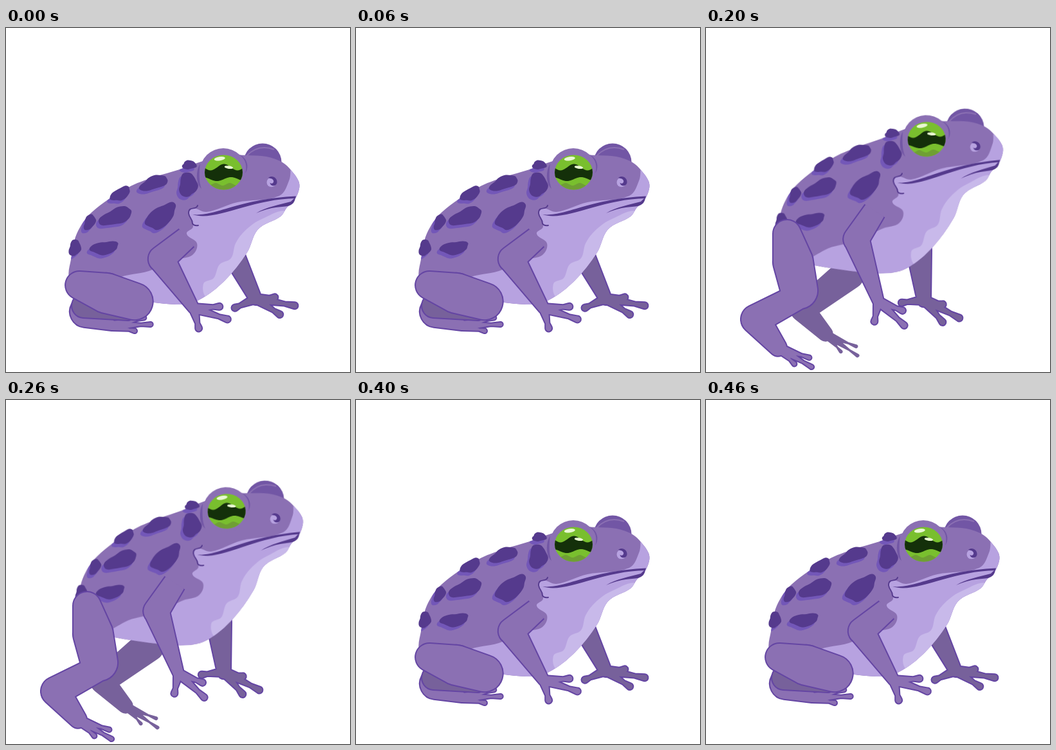
An HTML page that plays this animation: 535 by 535 pixels, repeating every 0.5 s.

```html
<!DOCTYPE html>
<html lang="en">
<head>
<meta charset="utf-8">
<title>Purple frog</title>
<style>
  html, body { margin: 0; width: 100%; height: 100%; overflow: hidden; background: #fff; }
  svg { display: block; width: 535px; height: 535px; }
  .limb { fill: #8b70b3; stroke: #6445a3; stroke-width: 4; paint-order: stroke; stroke-linejoin: round; }
  .far { fill: #77619b; }
  .shade { fill: #77619b; }
  .skin { fill: #8b70b3; }
  .pale { fill: #b7a2e0; }
  .glow { fill: #c8b9ea; }
  .fold { fill: #7256a5; }
  .spot { fill: #553a8d; }
  .rim { fill: #7357b8; }
  .pupil { fill: #14300a; }
  .moss { fill: #6f9f34; }
  .line { fill: none; stroke: #553a8d; stroke-width: 1.9; stroke-linecap: round; }

  .pose, #body, #nostril { animation: 500ms step-end infinite; }
  #body { animation-name: sway; transform-origin: 107px 342px; }
  #nostril { animation-name: nostril; }
  .rest { animation-name: rest; }
  .rise { animation-name: rise; }
  .leap { animation-name: leap; }
  .land { animation-name: land; }

  @keyframes sway {
    0%, 80%, 100% { transform: none; }
    20% { transform: translate(10px, -47.5px) rotate(8.2deg); }
    40% { transform: translate(10px, -41.5px) rotate(-2.5deg); }
    60% { transform: translate(3.2px, 12px) rotate(-8.7deg); }
  }
  @keyframes nostril { 0%, 40%, 100% { fill: #553a8d; } 20% { fill: #26132f; } }
  @keyframes rest { 0%, 80%, 100% { visibility: visible; } 20% { visibility: hidden; } }
  @keyframes rise { 0%, 40%, 100% { visibility: hidden; } 20% { visibility: visible; } }
  @keyframes leap { 0%, 60%, 100% { visibility: hidden; } 40% { visibility: visible; } }
  @keyframes land { 0%, 80%, 100% { visibility: hidden; } 60% { visibility: visible; } }
</style>
</head>
<body>
<svg viewBox="0 0 535 535">
  <defs>
    <clipPath id="torsoClip"></clipPath>
    <clipPath id="eyeClip"><ellipse cx="338.500" cy="224.500" rx="29.500" ry="27"/></clipPath>
  </defs>
  <g id="back"></g>
  <g id="body">
    <circle class="fold" cx="399" cy="209" r="29.600"/>
    <path d="M374 199Q392 180 417 189" fill="none" stroke="#8b70b3" stroke-width="2"/>
    <g id="torso"></g>
    <g id="belly" clip-path="url(#torsoClip)"></g>
    <g id="rims" clip-path="url(#torsoClip)"></g>
    <g id="spots"></g>
    <ellipse class="skin" cx="338" cy="222" rx="36" ry="35"/>
    <path class="fold" d="M302 211C294 224 296 243 304 250C300 240 300 224 302 211ZM363 197C374 205 375 216 372 226C379 216 375 202 363 197Z"/>
    <g clip-path="url(#eyeClip)">
      <path fill="#79bf2e" d="M300 190H375V260H300Z"/>
      <g id="iris"></g>
    </g>
    <g fill="#e9f8d2">
      <ellipse cx="332.300" cy="203.200" rx="8.600" ry="3" transform="rotate(-8 332.300 203.200)"/>
      <ellipse cx="346.500" cy="216.600" rx="6.800" ry="2.300" transform="rotate(8 346.500 216.600)"/>
    </g>
    <circle class="pale" cx="412.800" cy="240" r="7.300"/>
    <path id="nostril" fill="#553a8d" d="M408 233C414 228 422 233 421.500 240C421 247 411 247 410.500 240.500C413 243.500 417 241 416 237.500C415 234 411 234 408 233Z"/>
    <path class="spot" d="M290 290C325 294 360 266 451 261.500L450 265C380 266 325 302 290 290ZM389 288C405 278 425 275 443 270L450 263C449 280 432 277 420 279Q405 281 389 288Z"/>
    <path class="line" d="M298 276C296 284 284 276 284 288C285 296 290 296 290 304Q292 308 299 307"/>
  </g>
  <g id="front"></g>
</svg>
<script>
const NS = 'http://www.w3.org/2000/svg';
const get = id => document.getElementById(id);
const rad = deg => deg * Math.PI / 180;

function add(parent, tag, attrs) {
  const el = document.createElementNS(NS, tag);
  for (const k in attrs) el.setAttribute(k, attrs[k]);
  return parent.appendChild(el);
}
const draw = (id, cls, d) => add(get(id), 'path', { class: cls, d });

// Smooth closed curve through points.
function smooth(pts) {
  const n = pts.length, at = i => pts[(i + n) % n];
  const dir = i => {
    const a = at(i - 1), b = at(i + 1), l = Math.hypot(b[0] - a[0], b[1] - a[1]);
    return [(b[0] - a[0]) / l, (b[1] - a[1]) / l];
  };
  let d = 'M' + pts[0];
  for (let i = 0; i < n; i++) {
    const a = at(i), b = at(i + 1), u = dir(i), v = dir(i + 1);
    const k = Math.hypot(b[0] - a[0], b[1] - a[1]) / 3;
    d += `C${a[0] + u[0] * k},${a[1] + u[1] * k},${b[0] - v[0] * k},${b[1] - v[1] * k},${b}`;
  }
  return d + 'Z';
}
const through = text => smooth(text.trim().split(/\s+/).map(p => p.split(',').map(Number)));

// Torso, belly and chest
const torso = through(`98,388 101,360 110,320 134,286 190,248 230,232 270,220 300,209 340,198 375,198 405,200
  430,209 444,222 455,238 456,250 449,267 437,279 427,293 392,313 375,349 340,393 300,423 265,430 190,420 110,400`);
draw('torso', 'skin', torso);
draw('torsoClip', '', torso);
draw('belly', 'pale', through(`446,210 441,235 425,261 360,271 312,286 290,280 284,288 291,309 281,320 297,335
  290,353 265,360 222,378 172,390 140,420 230,450 400,400 480,280`));
draw('belly', 'glow', through('440,287 398,297 372,315 357,335 350,358 332,368 323,389 307,398 314,420 350,410 430,320'));

// Eye: bands bounded by waves
const wave = (mid, amp, crest, len) => x => mid - amp * Math.cos(2 * Math.PI * (x - crest) / len);
function band(cls, top, bottom) {
  const xs = Array.from({ length: 36 }, (_, i) => 304 + i * 2);
  const edge = f => x => `${x} ${f(x).toFixed(1)}`;
  draw('iris', cls, 'M' + [...xs.map(edge(top)), ...xs.reverse().map(edge(bottom))].join('L') + 'Z');
}
band('pupil', wave(216.5, 5, 339, 42), wave(235, 3, 350, 44));
band('moss', wave(243, 2, 326, 22), () => 260);

// Warts: lumpy ellipses over a shifted rim
[
  [107, 342, 9, 13, 15], [130, 302, 8, 13, 25], [178, 258, 17, 9, -28],
  [171, 293, 27, 12, -20], [230, 241, 23, 10, -20], [285, 213, 11, 7, -5],
  [283, 244, 14, 19, 5], [241, 293, 27, 15, -38], [153, 342, 22, 10, -8]
].forEach(([x, y, rx, ry, turn], n) => {
  const lump = (dx, dy) => smooth(Array.from({ length: 14 }, (_, i) => {
    const t = i * Math.PI / 7, k = 1 + .1 * Math.cos(3 * t + n) + .05 * Math.cos(5 * t + 2 * n);
    const u = rx * k * Math.cos(t), v = ry * k * Math.sin(t), c = Math.cos(rad(turn)), s = Math.sin(rad(turn));
    return [x + dx + u * c - v * s, y + dy + u * s + v * c];
  }));
  draw('rims', 'rim', lump(-4, 5));
  draw('spots', 'spot', lump(0, 0));
});

// Tapered bone around two circles [x, y, r]; an open bone has no cap at its start.
function bone([ax, ay, ar], [bx, by, br], open) {
  ar -= 1; br -= 1;
  const turn = Math.atan2(by - ay, bx - ax), phi = Math.acos((ar - br) / Math.hypot(bx - ax, by - ay));
  const on = (x, y, r, t) => `${(x + r * Math.cos(t)).toFixed(1)} ${(y + r * Math.sin(t)).toFixed(1)}`;
  const wide = phi > Math.PI / 2 ? 1 : 0;
  const a1 = on(ax, ay, ar, turn - phi), a2 = on(ax, ay, ar, turn + phi);
  const side = `L${on(bx, by, br, turn - phi)}A${br} ${br} 0 ${wide} 1 ${on(bx, by, br, turn + phi)}L${a2}`;
  return `M${a1}${side}` + (open ? '' : `A${ar} ${ar} 0 ${1 - wide} 1 ${a1}Z`);
}
const chain = (nodes, open) => nodes.slice(1).map((b, i) => bone(nodes[i], b, open && !i)).join('');

// Toes as [length, angle] from the wrist, with round tips
function toes([x, y, r], turn, shape, tip) {
  return shape.map(([len, deg]) => {
    const t = rad(turn + deg);
    const at = (k, size) => [x + len * k * Math.cos(t), y + len * k * Math.sin(t), size];
    const knuckle = at(.75, tip * .65);
    return bone([x, y, Math.min(r, 8)], knuckle) + bone(knuckle, at(1, tip));
  }).join('');
}
const nearHand = [[55, 0], [32, 58], [40, -22]];
const farHand = [[62, 0], [45, 23], [30, -14], [35, 146]];
const hindFoot = [[60, 0], [36, 15], [51, -12]];

function thigh(knee, hip) {
  const mid = knee.map((v, i) => (v + hip[i]) / 2);
  mid[2] += 6;
  return chain([knee, mid, hip]);
}

// Joints are [x, y, r]; turns are those of the near hand, far hand, near foot and far foot.
const poses = {
  rest: {
    arm: [[280, 327, 18], [242, 359, 21], [292, 436, 9]],
    farArm: [[355, 355, 17], [388, 421, 10]],
    leg: { knee: [114, 400, 22], hip: [199, 425, 29], heel: [124, 441, 25], ankle: [165, 463, 8] },
    turns: [18, 10, -2]
  },
  rise: {
    arm: [[276, 308, 18], [243, 355, 21], [257, 446, 9]],
    farArm: [[330, 375, 20], [333, 449, 13]],
    leg: { knee: [108, 343, 17.5], hip: [165, 407, 36.5], heel: [100, 428, 30], ankle: [133, 460, 13] },
    farLeg: [[250, 404, 26], [188, 430, 24], [203, 455, 10]],
    turns: [58, 32, 28, 20]
  },
  leap: {
    arm: [[262, 285, 18], [234, 328, 20.5], [268, 425, 9]],
    farArm: [[331, 345, 20], [339, 423, 11]],
    leg: { knee: [126, 320, 22], hip: [145, 408, 29], heel: [77, 453, 23], ankle: [112, 497, 14] },
    farLeg: [[222, 382, 26], [150, 438, 20], [186, 476, 13]],
    turns: [43, 27, 30, 34]
  },
  land: {
    arm: [[264, 320, 17], [246, 372, 20], [288, 460, 9]],
    farArm: [[337, 368, 17], [359, 437, 11]],
    leg: { knee: [117, 402, 18.5], hip: [189, 450, 37], heel: [122, 481, 22], ankle: [165, 508, 10] },
    farLeg: [[268, 420, 25], [212, 452, 32], [238, 480, 10]],
    turns: [39, 14, 6, 3]
  }
};
for (const [name, { arm, farArm, leg, farLeg, turns }] of Object.entries(poses)) {
  const back = add(get('back'), 'g', { class: 'pose ' + name });
  const front = add(get('front'), 'g', { class: 'pose ' + name });
  const part = (layer, cls, d) => add(layer, 'path', { class: cls, d });

  if (farLeg) part(back, 'shade', chain(farLeg) + toes(farLeg[2], turns[3], hindFoot, 4));
  part(back, 'limb far', chain(farArm) + toes(farArm[1], turns[1], farHand, 5.5));
  part(front, 'limb', chain(arm, true) + toes(arm[2], turns[0], nearHand, 5.5));

  const { knee, hip, heel, ankle } = leg;
  const foot = bone(heel, ankle) + toes(ankle, turns[2], hindFoot, 4);
  if (farLeg) {
    const calf = [hip[0], hip[1] + hip[2] * .3, hip[2] * .7];
    part(front, 'limb', thigh(knee, hip) + bone(calf, heel) + foot);
  } else {
    // Folded: the thigh covers the calf
    part(front, 'limb', foot);
    part(front, 'limb far', bone([heel[0] - 3, heel[1] - 9, 19], [190, 449, 6]));
    part(front, 'limb', thigh(knee, hip));
  }
}
</script>
</body>
</html>
```
